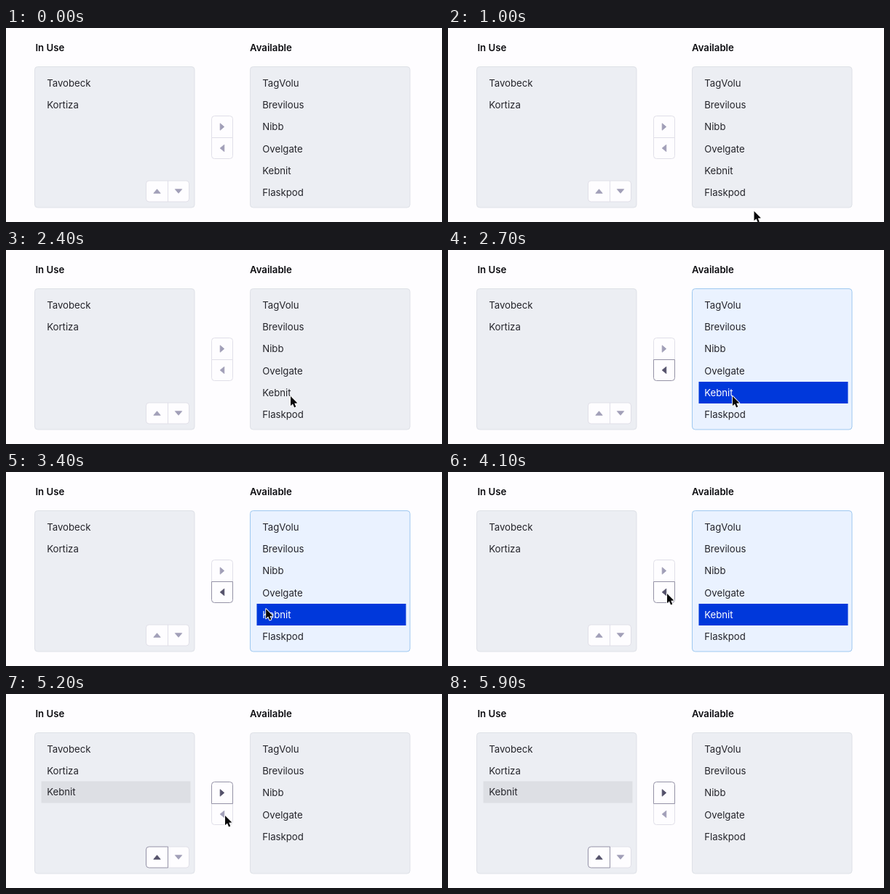
Write an HTML page with a canvas that moves like this. It is 599 by 268 pixels and loops after 7.3 s.

```html
<!DOCTYPE html>
<html lang="en">
<head>
<meta charset="utf-8">
<title>List picker</title>
<style>
html, body { margin: 0; width: 100%; height: 100%; overflow: hidden; background: #fefdff; }
canvas { display: block; width: 599px; height: 268px; }
</style>
</head>
<body>
<canvas id="stage"></canvas>
<script>
const W = 599, H = 268, LOOP = 7300, STEP = 100;
const SHOW = 1000, SELECT = 2600, MOVE = 4400, HIDE = 5900;
const PAPER = '#fefdff', INK = '#24242a';
const FONT = '13.2px Inter, "Open Sans", sans-serif';

const used = ['Tavobeck', 'Kortiza'];
const offered = ['TagVolu', 'Brevilous', 'Nibb', 'Ovelgate', 'Kebnit', 'Flaskpod'];
const PICK = 4;

const easeOut = k => 1 - (1 - k) ** 2;
const smooth = k => k * k * (3 - 2 * k);

// The pointer enters, heads for the button, then leaves
const START = { x: 420.5, y: 253 };
const legs = [
  { from: 1300, to: 2400, x: 391, y: 202, ease: easeOut },
  { from: 2900, to: 4100, x: 301, y: 168, ease: smooth },
  { from: 5300, to: 5800, x: 319, y: 237, ease: smooth }
];

const canvas = document.getElementById('stage');
const ctx = canvas.getContext('2d');
const dpr = window.devicePixelRatio || 1;
canvas.width = Math.round(W * dpr);
canvas.height = Math.round(H * dpr);

const mix = (a, b, k) => 'rgb(' + a.map((v, i) => Math.round(v + (b[i] - v) * k)).join(',') + ')';

function box(x, y, w, h, r, fill, line) {
  ctx.beginPath();
  ctx.roundRect(x, y, w, h, r);
  ctx.fillStyle = fill;
  ctx.fill();
  ctx.strokeStyle = line;
  ctx.lineWidth = 1;
  ctx.stroke();
}

function bar(x, y, color) {
  ctx.fillStyle = color;
  ctx.fillRect(x, y, 205, 30);
}

function label(str, x, y, color, weight = 400) {
  ctx.font = weight + ' ' + FONT;
  ctx.fillStyle = color;
  ctx.fillText(str, x, y);
}

function panel(x, active) {
  box(x, 53.5, 219.5, 194.5, 4,
    mix([236, 238, 243], [234, 242, 255], active),
    mix([222, 225, 231], [158, 200, 240], active));
}

function rows(list, x, gap, pick, color) {
  list.forEach((name, i) => label(name, x, 80.8 + gap * i, i === pick ? color : INK));
}

function arrow(x, y, turn, on) {
  ctx.save();
  ctx.translate(x, y);
  ctx.rotate(turn * Math.PI / 2);
  ctx.beginPath();
  ctx.moveTo(-2.8, -4.7);
  ctx.lineTo(2.8, 0);
  ctx.lineTo(-2.8, 4.7);
  ctx.closePath();
  ctx.fillStyle = ctx.strokeStyle = mix([161, 159, 184], [84, 81, 106], on);
  ctx.lineJoin = 'round';
  ctx.lineWidth = 0.8;
  ctx.fill();
  ctx.stroke();
  ctx.restore();
}

// One half of a joined pair; only its outer corners are round
function button(x, y, vertical, end, on) {
  const long = 30 - end, wide = 29;
  const w = vertical ? wide : long, h = vertical ? long : wide;
  if (vertical) y += 30 * end; else x += 30 * end;
  const radii = [0, 1, 2, 3].map(c => (vertical ? c > 1 : c % 3 > 0) === (end === 1) ? 4 : 0);
  box(x, y, w, h, radii, PAPER, mix([224, 223, 232], [148, 146, 166], on));
  arrow(x + w / 2, y + h / 2, vertical ? 2 * end : 3 - 2 * end, on);
}

// The enabled half goes on top so its border stays whole
function pair(x, y, vertical, on) {
  [0, 1].sort((a, b) => on[a] - on[b]).forEach(end => button(x, y, vertical, end, on[end]));
}

function pointerAt(t) {
  let { x, y } = START;
  for (const leg of legs) {
    const k = leg.ease(Math.min(1, Math.max(0, (t - leg.from) / (leg.to - leg.from))));
    x += (leg.x - x) * k;
    y += (leg.y - y) * k;
  }
  return [x, y];
}

function pointer(x, y) {
  ctx.save();
  ctx.translate(x, y);
  ctx.beginPath();
  ctx.moveTo(0, 0);
  ctx.lineTo(0, 13.2);
  ctx.lineTo(3, 10.4);
  ctx.lineTo(5.1, 15.4);
  ctx.lineTo(7.3, 14.4);
  ctx.lineTo(5.3, 9.7);
  ctx.lineTo(9.4, 9.6);
  ctx.closePath();
  ctx.lineJoin = 'round';
  ctx.lineWidth = 1.8;
  ctx.strokeStyle = '#fff';
  ctx.stroke();
  ctx.fillStyle = '#08080a';
  ctx.fill();
  ctx.restore();
}

function draw(t) {
  const moved = t >= MOVE;
  const picked = t >= SELECT && !moved;
  const glow = picked ? Math.min(1, 0.5 + (t - SELECT) / 200) : 0;
  const done = moved ? 1 : 0;
  const left = moved ? used.concat(offered[PICK]) : used;
  const right = moved ? offered.filter((name, i) => i !== PICK) : offered;

  ctx.setTransform(dpr, 0, 0, dpr, 0, 0);
  ctx.fillStyle = PAPER;
  ctx.fillRect(0, 0, W, H);
  label('In Use', 40.4, 32.4, '#0c0c10', 600);
  label('Available', 335, 32.4, '#0c0c10', 600);

  panel(39.5, 0);
  panel(335.5, glow);
  if (moved) bar(48.5, 120.5, '#dddfe4');
  if (picked) bar(344.5, 182, '#0038db');
  rows(left, 56.2, 29.8, -1, INK);
  rows(right, 352.2, 30.3, picked ? PICK : -1, '#fff');

  pair(282.5, 121.5, true, [done, glow]);
  pair(192.5, 211, false, [done, 0]);

  if (t >= SHOW && t < HIDE) pointer(...pointerAt(t));
}

function tick() {
  const t = performance.now() % LOOP;
  draw(Math.floor(t / STEP) * STEP);
  requestAnimationFrame(tick);
}
tick();
</script>
</body>
</html>
```
